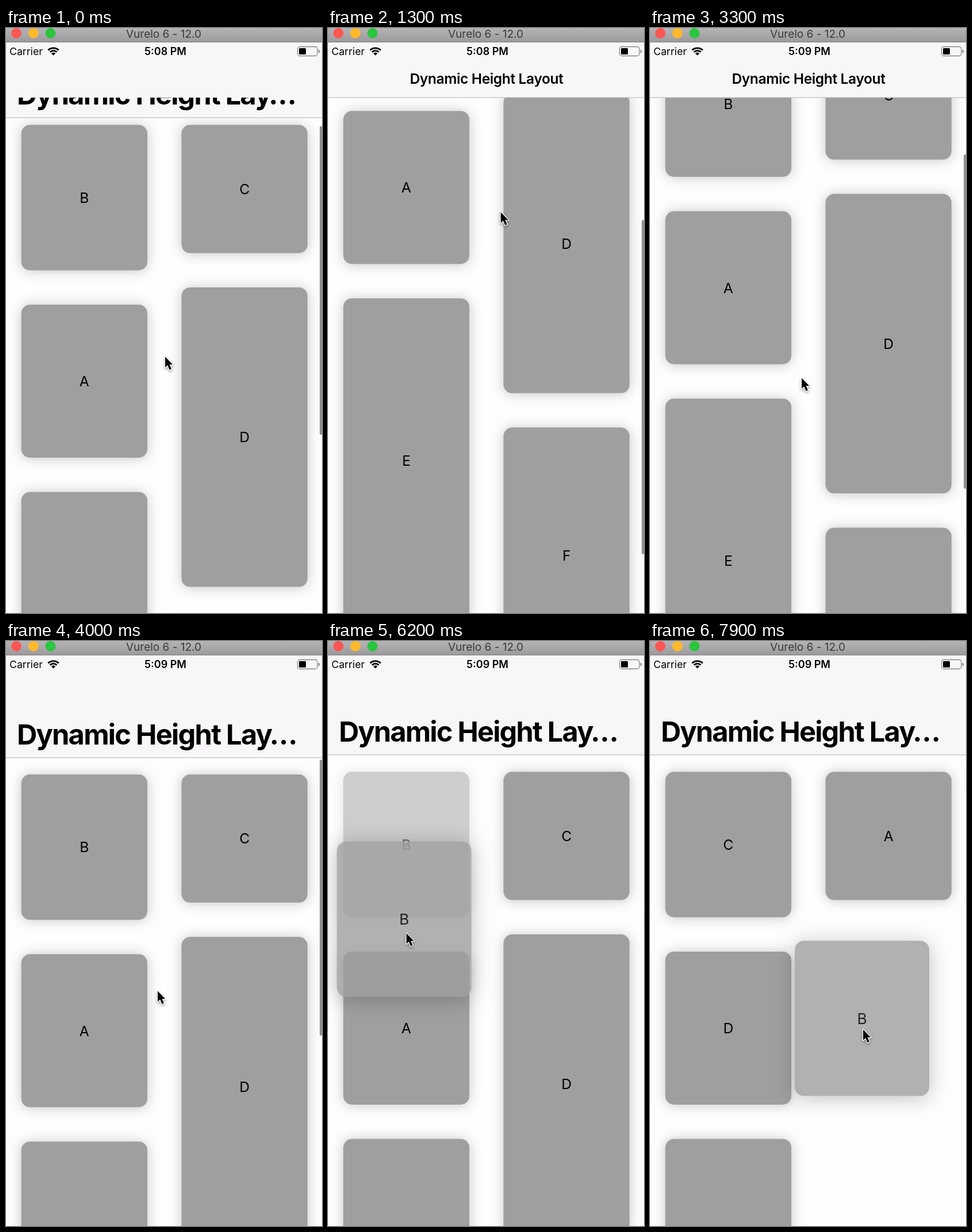
These frames come from a looping animation (550x1017 px, 8000 ms). An HTML page with a canvas:

```html
<!DOCTYPE html>
<html lang="en">
<head>
<meta charset="utf-8">
<title>Dynamic Height Layout</title>
<style>
  html, body { margin: 0; width: 100%; height: 100%; overflow: hidden; background: #fefdff; }
  canvas { display: block; }
</style>
</head>
<body>
<canvas id="stage" width="550" height="1017"></canvas>
<script>
const ctx = document.getElementById('stage').getContext('2d');
const LOOP = 8000, STEP = 100;
const BAR = 121, REST = 198, MARGIN = 29.5, BOTTOM = 1017, CONTENT = 1367.5;
const LEFT = 26.7, RIGHT = 305.5, CARD_W = 219.3;

// x, top and height of each place in the grid, relative to the first row
const SLOTS = [
  [LEFT, 0, 252.7], [RIGHT, 0, 222.8],
  [LEFT, 312.5, 266], [RIGHT, 282.6, 520.5],
  [LEFT, 638.2, 563.3], [RIGHT, 862.8, 445.8]
];

// time, top of the first row
const SCROLL = [
  [0, 168.5], [100, 135], [300, 62], [500, 5], [700, -30], [800, -41.5], [1000, -60],
  [1200, -130], [1500, -240], [1800, -307], [2100, -322], [2600, -322], [2700, -314],
  [3000, -145], [3300, 6], [3600, 128], [3800, 196], [4000, 232], [4200, 229.5], [4400, 227.5]
];
const POINTER = [
  [0, 276, 570], [300, 279, 464], [600, 282, 400], [1000, 282, 399], [1400, 305, 300],
  [1700, 311, 290], [2600, 311, 290], [2700, 309, 298], [3000, 285, 467], [3250, 263, 607],
  [4100, 263, 607], [4400, 195, 470], [4700, 139, 377]
];
// time, centre of the card being dragged
const DRAG = [
  [5800, 136.5, 354], [6000, 135.5, 400], [6200, 132.5, 483.5], [6400, 134, 565],
  [6600, 141, 638], [6800, 178, 670], [7100, 290, 676], [7500, 372, 662], [7900, 369, 656]
];

const clamp = (v, lo = 0, hi = 1) => Math.min(hi, Math.max(lo, v));
const mix = (a, b, p) => a + (b - a) * p;
const ramp = (t, from, to) => clamp((t - from) / (to - from));
const ease = p => p * p * (3 - 2 * p);

// Smooth curve through the keys, without overshoot
function follow(keys, t) {
  const last = keys.length - 1;
  if (t <= keys[0][0]) return keys[0].slice(1);
  if (t >= keys[last][0]) return keys[last].slice(1);
  const i = keys.findIndex(k => k[0] > t) - 1;
  const a = keys[i], b = keys[i + 1], span = b[0] - a[0], p = (t - a[0]) / span;
  const slope = (j, c) => (keys[j + 1][c] - keys[j][c]) / (keys[j + 1][0] - keys[j][0]);
  const tangent = (j, c) => {
    if (j === 0) return slope(0, c);
    if (j === last) return 0;
    const m = slope(j - 1, c), n = slope(j, c);
    return m * n > 0 ? 2 * m * n / (m + n) : 0;
  };
  return a.slice(1).map((_, n) => {
    const c = n + 1, q = 1 - p;
    return a[c] * (1 + 2 * p) * q * q + b[c] * (3 - 2 * p) * p * p +
      span * (tangent(i, c) * p * q * q - tangent(i + 1, c) * p * p * q);
  });
}

function text(str, x, y, size, { weight = 400, align = 'center', color = '#000', spacing = 0 } = {}) {
  ctx.font = `${weight} ${size}px Inter, "Liberation Sans", sans-serif`;
  ctx.letterSpacing = spacing + 'px';
  ctx.textAlign = align;
  ctx.fillStyle = color;
  ctx.fillText(str, x, y);
}

function roundRect(x, y, w, h, r, color) {
  ctx.beginPath();
  ctx.roundRect(x, y, w, h, r);
  ctx.fillStyle = color;
  ctx.fill();
}

function setShadow(alpha, blur, dy = 0) {
  ctx.shadowColor = `rgba(0,0,0,${alpha})`;
  ctx.shadowBlur = blur;
  ctx.shadowOffsetY = dy;
}

function card(label, x, y, w, h, { alpha = 1, scale = 1, shadow = [0.22, 22, 1] } = {}) {
  const r = 15 * scale;
  ctx.save();
  ctx.globalAlpha = alpha;
  // Keep the shadow outside, so it does not show through a translucent card
  ctx.save();
  ctx.beginPath();
  ctx.rect(-100, -100, 800, 1300);
  ctx.roundRect(x, y, w, h, r);
  ctx.clip('evenodd');
  setShadow(...shadow);
  roundRect(x, y, w, h, r, '#a09ea1');
  ctx.restore();
  roundRect(x, y, w, h, r, '#a09ea1');
  text(label, x + w / 2, y + h / 2 + 9 * scale, 24.6 * scale);
  ctx.restore();
}

function cards(t, top) {
  const first = ease(ramp(t, 6350, 6700)), second = ease(ramp(t, 6950, 7300));
  const place = (label, from, to = from, p = 0, look) => {
    const [x, y, h] = SLOTS[from].map((v, i) => mix(v, SLOTS[to][i], p));
    card(label, x, top + y, CARD_W, h, look);
  };
  const ghost = t < 6200 ? mix(1, 0.5, ramp(t, 5900, 6200)) : mix(0.5, 0, ramp(t, 6200, 6500));
  if (ghost > 0) place('B', 0, 0, 0, { alpha: ghost });
  place('C', 1, 0, first);
  place('A', 2, 1, first);
  place('D', 3, 2, second);
  place('E', 4);
  place('F', 5);
}

function liftedCard(t) {
  if (t < 5300) return;
  const lift = ease(ramp(t, 5200, 5700)), scale = mix(1, 1.067, lift);
  const [cx, cy] = follow(DRAG, t), w = CARD_W * scale, h = 252.7 * scale;
  card('B', cx - w / 2, cy - h / 2, w, h, {
    scale,
    alpha: mix(1, 0.8, ramp(t, 5800, 6100)),
    shadow: [mix(0.22, 0.3, lift), mix(22, 36, lift), mix(1, 4, lift)]
  });
}

function scrollBar(t, top, header) {
  const alpha = 1 - ramp(t, 4400, 4700);
  if (!alpha) return;
  const ratio = (BOTTOM - header) / CONTENT;
  const start = header + 4 + Math.max(0, header + MARGIN - top) * ratio;
  ctx.globalAlpha = alpha;
  roundRect(546, start, 4.4, (1008 - header) * ratio, 2.2, '#918f92');
  ctx.globalAlpha = 1;
}

function navigation(header) {
  ctx.fillStyle = '#f8f6f9';
  ctx.fillRect(0, 24, 550, header - 24);
  ctx.fillStyle = '#b3b1b4';
  ctx.fillRect(0, Math.round(header) - 0.5, 550, 1);

  ctx.save();
  ctx.beginPath();
  ctx.rect(0, BAR, 550, header - BAR);
  ctx.clip();
  const size = 48.5 * (1 + Math.max(0, header - REST) * 0.0008);
  text('Dynamic Height Lay…', 19, header - 23, size, { weight: 700, align: 'left', spacing: -1.7 });
  ctx.restore();

  ctx.globalAlpha = clamp((135 - header) / 14);
  text('Dynamic Height Layout', 276, 96.5, 24.5, { weight: 600, spacing: -0.35 });
  ctx.globalAlpha = 1;
}

function statusBar(t) {
  text('Carrier', 6, 47, 17.7, { align: 'left' });
  text(t < 2500 ? '5:08 PM' : '5:09 PM', 277.5, 47, 18, { weight: 600 });

  const wedge = [-Math.PI * 0.75, -Math.PI * 0.25];
  ctx.strokeStyle = ctx.fillStyle = '#000';
  ctx.lineWidth = 2.8;
  for (const r of [13, 8.4]) {
    ctx.beginPath();
    ctx.arc(82.5, 47.8, r, ...wedge);
    ctx.stroke();
  }
  ctx.beginPath();
  ctx.moveTo(82.5, 47.8);
  ctx.arc(82.5, 47.8, 5.2, ...wedge);
  ctx.fill();

  ctx.beginPath();
  ctx.roundRect(507.5, 32.5, 34.5, 16, 4);
  ctx.strokeStyle = '#858486';
  ctx.lineWidth = 1.3;
  ctx.stroke();
  roundRect(543.8, 38, 2.2, 5.5, [0, 2, 2, 0], '#858486');
  roundRect(510, 35, 12, 11, 1.5, '#000');
}

function windowBar() {
  const shade = ctx.createLinearGradient(0, 0, 0, 24);
  shade.addColorStop(0, '#b5b3b6');
  shade.addColorStop(1, '#9c9a9d');
  ctx.fillStyle = shade;
  ctx.fillRect(0, 0, 550, 24);
  ctx.fillStyle = '#807e81';
  ctx.fillRect(0, 24, 550, 1);
  ['#fc5753', '#fdb92c', '#2ac63f'].forEach((color, i) => {
    ctx.beginPath();
    ctx.arc(18 + i * 29.7, 9, 9, 0, Math.PI * 2);
    ctx.fillStyle = color;
    ctx.fill();
  });
  text('Vurelo 6 - 12.0', 274.5, 16.5, 19, { color: '#3b393c' });
}

function pointer(t) {
  let [x, y] = follow(POINTER, t);
  if (t > 5800) {
    const [cx, cy] = follow(DRAG, t), p = ramp(t, 6200, 7900);
    x = cx + mix(3, 1, p);
    y = cy + mix(23, 18, p);
  }
  ctx.save();
  ctx.translate(x + 1, y + 1.5);
  const shape = new Path2D('M0 0V18.6L4.2 14.8L7.5 22.6L10.9 21.2L7.6 13.6H13.2Z');
  ctx.lineJoin = 'round';
  ctx.lineWidth = 2.6;
  ctx.strokeStyle = '#fff';
  setShadow(0.4, 4, 2);
  ctx.stroke(shape);
  setShadow(0, 0);
  ctx.fillStyle = '#000';
  ctx.fill(shape);
  ctx.restore();
}

function draw(t) {
  const [top] = follow(SCROLL, t);
  const lag = 17 * (1 - ramp(t, 0, 200));
  const header = Math.max(BAR, top - MARGIN + lag);
  ctx.fillStyle = '#fefdff';
  ctx.fillRect(0, 0, 550, BOTTOM);
  cards(t, top);
  scrollBar(t, top, header);
  navigation(header);
  statusBar(t);
  windowBar();
  liftedCard(t);
  pointer(t);
}

const begin = performance.now();
function tick() {
  const t = (performance.now() - begin) % LOOP;
  draw(Math.floor(t / STEP) * STEP);
  requestAnimationFrame(tick);
}
tick();
</script>
</body>
</html>
```
